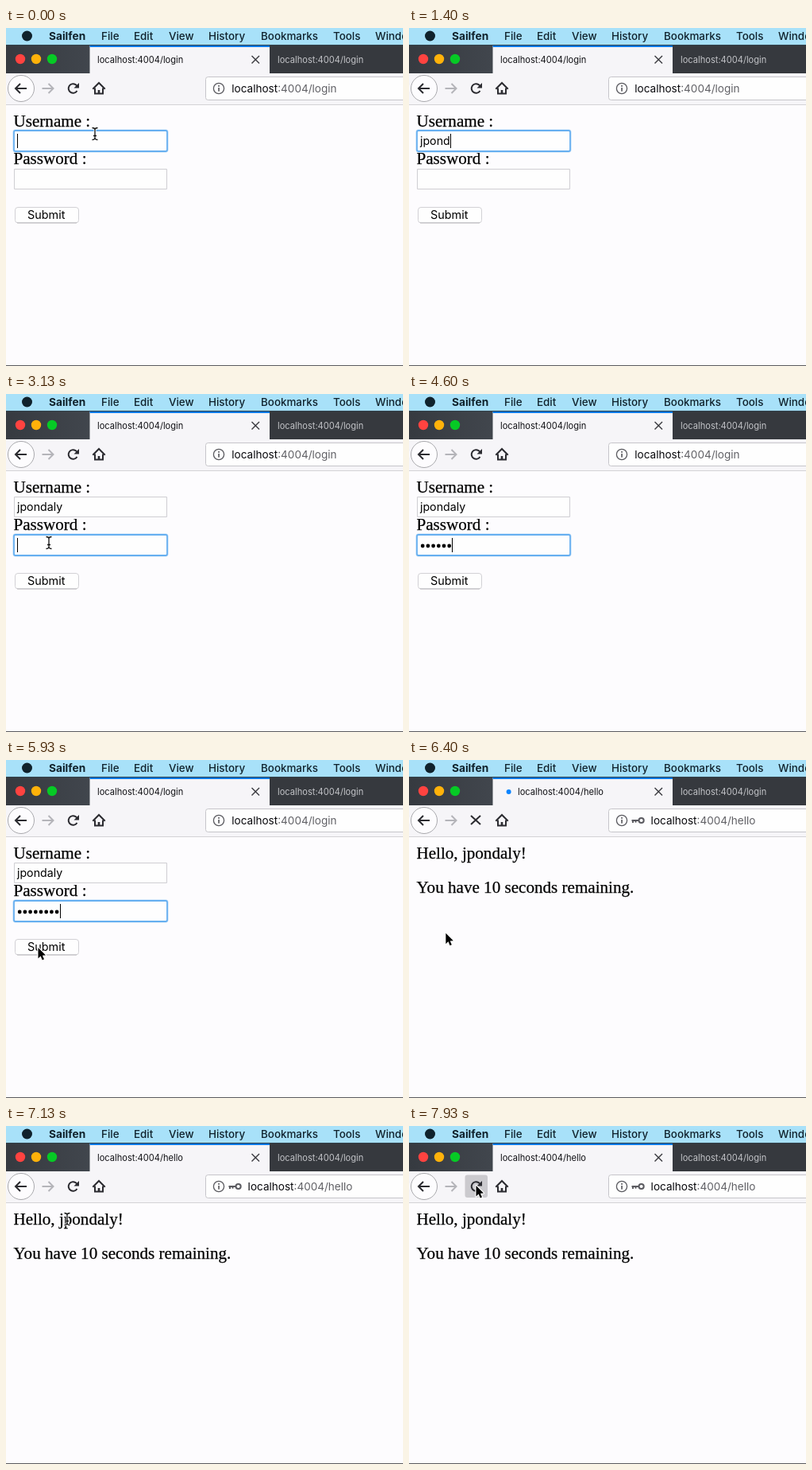
An HTML page with a canvas for the animation above (8000 ms loop, 500x425 px).

```html
<!DOCTYPE html>
<html lang="en">
<head>
<meta charset="utf-8">
<title>Login session</title>
<style>
html, body { margin: 0; width: 100%; height: 100%; overflow: hidden; background: #fdfcfe; }
canvas { display: block; width: 500px; height: 425px; }
</style>
</head>
<body>
<canvas id="stage" width="500" height="425"></canvas>
<script>
const ctx = document.getElementById('stage').getContext('2d');
const LOOP = 8000, STEP = 1000 / 15;
const SANS = 'Inter, "Liberation Sans", sans-serif';
const SERIF = '"Liberation Serif", "Times New Roman", serif';
const DARK = '#2b2b30', PALE = '#b4b4b9';
const USER = 'jpondaly';

// When each key is pressed
const userKeys = [470, 670, 870, 1130, 1400, 1600, 1800, 2000];
const passKeys = [3470, 3800, 4000, 4200, 4400, 4600, 4800, 5000];
const FOCUS_PASS = 3000, CLICK = 6070, LOADED = 6200, BURST = 6600,
      RELOAD_READY = 6800, LABEL_BACK = 7130, PRESS = 7930;

// Pointer runs, each a list of [time, x, y]; hidden in between
const runs = [
  [[0, 112, 133], [70, 112, 132], [130, 113, 131], [470, 113, 131]],
  [[2470, 113, 131], [2930, 54, 187], [3470, 54, 187]],
  [[5400, 54, 187], [5670, 45, 246], [5870, 40, 236], [6270, 40, 236],
   [6730, 70, 142], [7070, 77, 117], [7130, 77, 117], [7530, 84, 75], [8000, 84, 75]]
];

const passed = (t, list) => list.filter(k => t >= k - 5).length;

function rect(x, y, w, h, fill) {
  ctx.fillStyle = fill;
  ctx.fillRect(x, y, w, h);
}

function box(x, y, w, h, r, fill, stroke, lw = 1) {
  ctx.beginPath();
  ctx.roundRect(x, y, w, h, r);
  if (fill) { ctx.fillStyle = fill; ctx.fill(); }
  if (stroke) { ctx.strokeStyle = stroke; ctx.lineWidth = lw; ctx.stroke(); }
}

function disc(x, y, r, fill, stroke, lw = 1) {
  ctx.beginPath();
  ctx.arc(x, y, r, 0, Math.PI * 2);
  if (fill) { ctx.fillStyle = fill; ctx.fill(); }
  if (stroke) { ctx.strokeStyle = stroke; ctx.lineWidth = lw; ctx.stroke(); }
}

function trace(points) {
  ctx.beginPath();
  points.forEach(([x, y]) => ctx.lineTo(x, y));
}

function line(points, color, lw) {
  trace(points);
  ctx.strokeStyle = color;
  ctx.lineWidth = lw;
  ctx.stroke();
}

// Draws text and returns its right edge
function text(str, x, y, size, color, weight = 400) {
  ctx.font = `${weight} ${size}px ${SANS}`;
  ctx.fillStyle = color;
  ctx.fillText(str, x, y);
  return x + ctx.measureText(str).width;
}

// Page text, with a hairline outline for a fuller weight
function pageText(str, y) {
  ctx.font = `21.1px ${SERIF}`;
  ctx.fillStyle = ctx.strokeStyle = '#000';
  ctx.lineWidth = 0.25;
  ctx.fillText(str, 9.5, y);
  ctx.strokeText(str, 9.5, y);
}

function menuBar() {
  rect(0, 0, 500, 21, '#a8e1f9');
  disc(26.5, 10, 6.5, '#10222c');
  text('Sailfen', 54, 15, 13.7, '#10222c', 700);
  const items = { File: 120, Edit: 161, View: 205, History: 255, Bookmarks: 321, Tools: 412, Window: 465 };
  for (const name in items) text(name, items[name], 15, 13.4, '#10222c', 500);
}

function tabBar(t) {
  const shade = ctx.createLinearGradient(0, 0, 106, 0);
  shade.addColorStop(0, '#363a40');
  shade.addColorStop(1, '#41464d');
  rect(0, 22, 106, 35, shade);
  rect(331, 22, 169, 35, '#36393e');
  rect(0, 21, 500, 1, '#31424b');
  rect(105.5, 22, 226.5, 35, '#f6f5f8');
  ['#ff4340', '#ffb20a', '#06ca25'].forEach((c, i) => disc(18 + 20 * i, 39, 6.2, c));

  const p = (t - BURST) / 375;
  if (p > 0 && p < 1) {
    ctx.save();
    ctx.beginPath();
    ctx.rect(105.5, 24, 176.5, 32);
    ctx.clip();
    ctx.globalAlpha = 0.23 * (1 - p);
    disc(121, 40, 16 + 500 * p, '#0a84ff');
    ctx.restore();
  }
  rect(105.5, 22, 226.5, 2, '#0a78e6');

  const loading = t >= CLICK && t < LABEL_BACK - 5;
  if (t >= CLICK && t < BURST)
    disc(121 + 5 * Math.sin((t - CLICK) / 1050 * Math.PI * 2), 40, 3, '#0a84ff');
  const page = t >= LOADED - 5 ? 'hello' : 'login';
  text('localhost:4004/' + page, loading ? 137 : 115, 44, 11.1, '#111115');
  line([[309.5, 35], [319, 44.5]], '#3c3c41', 1.4);
  line([[319, 35], [309.5, 44.5]], '#3c3c41', 1.4);
  text('localhost:4004/login', 342, 44, 11.1, '#c3c4c8');
}

function arrowIcon(x, y, dir, color) {
  line([[x - 7 * dir, y], [x + 7 * dir, y]], color, 2);
  line([[x + dir, y - 6], [x + 7 * dir, y], [x + dir, y + 6]], color, 2);
}

function reloadIcon(color) {
  ctx.beginPath();
  ctx.arc(84.5, 76, 5.8, 0.55, -0.65);
  ctx.strokeStyle = color;
  ctx.lineWidth = 2;
  ctx.stroke();
  trace([[92, 69], [92, 75.5], [85.5, 75.5]]);
  ctx.fillStyle = color;
  ctx.fill();
}

function reloadButton(t, pointer) {
  const hover = pointer && Math.abs(pointer.x - 85) < 15 && pointer.y > 60 && pointer.y < 91;
  if (hover) box(70.5, 61.5, 28.5, 28.5, 3, t >= PRESS - 5 ? '#cbcace' : '#dddce0');
  if (t >= CLICK && t < RELOAD_READY) {
    const dim = t >= BURST + 60;
    line([[78, 70], [90, 81]], dim ? PALE : DARK, dim ? 1.5 : 2);
    if (!dim) line([[90, 70], [78, 81]], DARK, 2);
  } else {
    reloadIcon(t >= RELOAD_READY && t < 7060 ? PALE : DARK);
  }
}

function homeIcon() {
  line([[109.3, 76.7], [117, 69], [124.7, 76.7]], DARK, 2);
  line([[112, 75.5], [112, 82.5], [122, 82.5], [122, 75.5]], DARK, 2);
  rect(115.7, 78, 2.6, 4.5, DARK);
}

function toolBar(t, pointer) {
  rect(0, 57, 500, 39, '#f6f5f8');
  rect(0, 96, 500, 1, '#d3d2d6');
  disc(19, 76, 16.5, '#fdfcfe', '#a9a9ad');
  arrowIcon(19, 76, -1, DARK);
  arrowIcon(52.5, 76, 1, PALE);
  reloadButton(t, pointer);
  homeIcon();

  box(251.5, 61.5, 260, 29, 3, '#fefefe', '#c6c5ca');
  disc(268, 76, 6.6, null, '#5b5b60', 1.3);
  rect(267.2, 75, 1.7, 4.6, '#5b5b60');
  rect(267.2, 72, 1.7, 1.8, '#5b5b60');
  const hello = t >= LOADED - 5;
  if (hello) {
    disc(292.6, 76, 3.1, null, '#5b5b60', 2);
    rect(280.5, 75, 9, 2, '#5b5b60');
    rect(281, 76, 2, 3, '#5b5b60');
    rect(284.5, 76, 2, 2.6, '#5b5b60');
  }
  const x = text('localhost', hello ? 304.6 : 284.3, 81, 13.55, '#08080c');
  text(':4004/' + (hello ? 'hello' : 'login'), x, 81, 13.55, '#616166');
}

function field(y, focused) {
  if (focused) {
    box(9, y - 1, 195, 28, 2.5, null, '#b9dbf8', 1);
    box(10, y, 193, 26, 2, '#fefefe', '#66aff0', 1.8);
  } else {
    box(10.5, y + 0.5, 192, 25, 0, '#fefefe', '#cfced2');
  }
}

function caret(x, y) {
  rect(Math.round(x), y, 1, 18, '#000');
}

function form(t) {
  const onPass = t >= FOCUS_PASS - 5;
  pageText('Username :', 124);
  field(129, !onPass);
  const end = text(USER.slice(0, passed(t, userKeys)), 14, 147, 14.2, '#000');
  if (!onPass) caret(end, 133);

  pageText('Password :', 171);
  field(177, onPass);
  const dots = passed(t, passKeys);
  for (let i = 0; i < dots; i++) disc(17.2 + 6.7 * i, 191, 2.4, '#000');
  if (onPass) caret(14 + 6.7 * dots, 181);

  box(11.5, 225.5, 80, 19.5, 3.5, '#fefefe', '#d2d1d5');
  line([[14, 245], [89, 245]], '#b9b8bc', 1);
  text('Submit', 27, 240, 14.4, '#000');
}

function greeting() {
  pageText(`Hello, ${USER}!`, 124);
  pageText('You have 10 seconds remaining.', 167);
}

function pointerAt(t) {
  const run = runs.find(r => t >= r[0][0] - 5 && t < r[r.length - 1][0] - 5);
  if (!run) return null;
  const i = Math.max(1, run.findIndex(k => k[0] > t));
  const [t0, x0, y0] = run[i - 1], [t1, x1, y1] = run[i];
  const u = Math.min(1, Math.max(0, (t - t0) / (t1 - t0)));
  const e = u * u * (3 - 2 * u);
  return { x: x0 + (x1 - x0) * e, y: y0 + (y1 - y0) * e };
}

function beam(x, y) {
  for (const [color, lw] of [['#fff', 3], ['#111', 1.3]]) {
    ctx.beginPath();
    for (const s of [-1, 1]) {
      ctx.moveTo(x - 3.5, y + 7.5 * s);
      ctx.quadraticCurveTo(x, y + 7.5 * s, x, y + 5 * s);
      ctx.quadraticCurveTo(x, y + 7.5 * s, x + 3.5, y + 7.5 * s);
    }
    ctx.moveTo(x, y - 6);
    ctx.lineTo(x, y + 6);
    ctx.moveTo(x - 2, y + 2.5);
    ctx.lineTo(x + 2, y + 2.5);
    ctx.strokeStyle = color;
    ctx.lineWidth = lw;
    ctx.stroke();
  }
}

function arrow(x, y) {
  ctx.save();
  ctx.translate(x, y);
  trace([[0.5, 0], [0.5, 13.5], [3.6, 10.6], [5.7, 15.6], [8, 14.6], [5.9, 9.8], [10, 9.6]]);
  ctx.closePath();
  ctx.lineJoin = 'round';
  ctx.strokeStyle = '#fff';
  ctx.lineWidth = 2.4;
  ctx.stroke();
  ctx.fillStyle = '#000';
  ctx.fill();
  ctx.restore();
}

function draw(t) {
  const pointer = pointerAt(t);
  rect(0, 0, 500, 425, '#fdfcfe');
  menuBar();
  toolBar(t, pointer);
  tabBar(t);
  if (t >= LOADED - 5) greeting(); else form(t);
  rect(0, 424, 500, 1, '#5a5a5e');
  if (pointer) (pointer.y > 97 && pointer.y < 205 ? beam : arrow)(pointer.x, pointer.y);
}

function tick() {
  const now = performance.now() % LOOP;
  draw(Math.floor(now / STEP + 0.1) * STEP % LOOP);
  requestAnimationFrame(tick);
}
tick();
</script>
</body>
</html>
```
